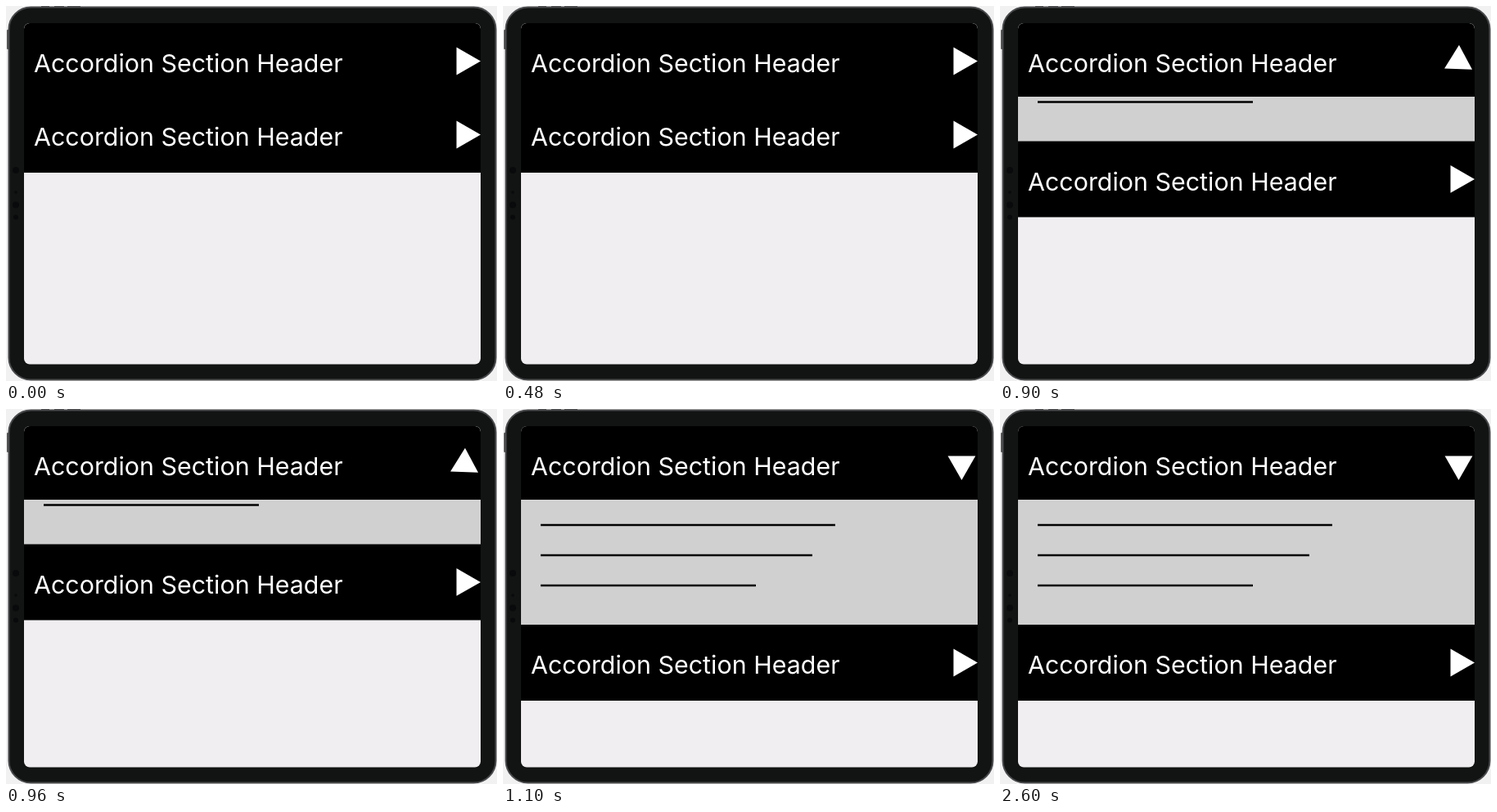
These frames come from a looping animation (600 by 459 pixels, 3.6 s). An HTML page:

```html
<!DOCTYPE html>
<html lang="en">
<head>
<meta charset="utf-8">
<title>Accordion on a tablet</title>
<style>
  html, body { margin: 0; width: 100%; height: 100%; overflow: hidden; background: #f1f1f2; }
  svg { display: block; width: 100%; height: 100%; }
  text { font: 400 30.4px Inter, sans-serif; fill: #fff; }
</style>
</head>
<body>
<svg viewBox="0 0 600 459">
  <defs>
    <clipPath id="screen"><rect x="22" y="21" width="558" height="417.5" rx="7"/></clipPath>
    <path id="arrow" d="M19.5 0L-10 -16.9V16.9Z" fill="#fff"/>
  </defs>

  <!-- Tablet body -->
  <path d="M43 .5H53M59 .5H71M75 .5H91" stroke="#555" stroke-width="1.5"/>
  <rect x="1" y="29" width="4" height="24" rx="1" fill="#555"/>
  <rect x="3.5" y="1.5" width="595" height="456" rx="27" fill="#121413" stroke="#48494b" stroke-width="2"/>
  <g fill="#090a0b">
    <circle cx="12" cy="201" r="4"/>
    <circle cx="12" cy="228" r="1.8"/>
    <circle cx="12" cy="243.5" r="4"/>
    <circle cx="12" cy="258.5" r="3"/>
  </g>

  <g clip-path="url(#screen)">
    <rect x="22" y="21" width="558" height="418" fill="#f0eef1"/>
    <g id="lower">
      <rect x="22" y="-42" width="558" height="153" fill="#d0d0d0"/>
      <path d="M46 -11H406M46 26H378M46 63H309" stroke="#000" stroke-width="2.4"/>
      <rect x="22" y="111" width="558" height="93"/>
      <text x="34" y="171.3">Accordion Section Header</text>
      <use href="#arrow" x="560.5" y="157.5"/>
    </g>
    <rect x="22" y="21" width="558" height="90"/>
    <text x="34" y="81.3">Accordion Section Header</text>
    <use href="#arrow" id="toggle"/>
  </g>
</svg>
<script>
  const LOOP = 3600, OPEN_AT = 800, STEP = 100, PANEL = 153;
  const openness = [0, .069, .356, .8, 1];
  const lower = document.getElementById('lower');
  const toggle = document.getElementById('toggle');
  const start = performance.now();

  function draw() {
    const time = (performance.now() - start) % LOOP;
    const step = Math.floor((time - OPEN_AT) / STEP) + 1;
    const open = openness[Math.max(0, Math.min(step, openness.length - 1))];
    lower.setAttribute('transform', `translate(0 ${PANEL * open})`);
    toggle.setAttribute('transform', `translate(560.5 67.5) rotate(${90 * open})`);
    requestAnimationFrame(draw);
  }
  draw();
</script>
</body>
</html>
```
